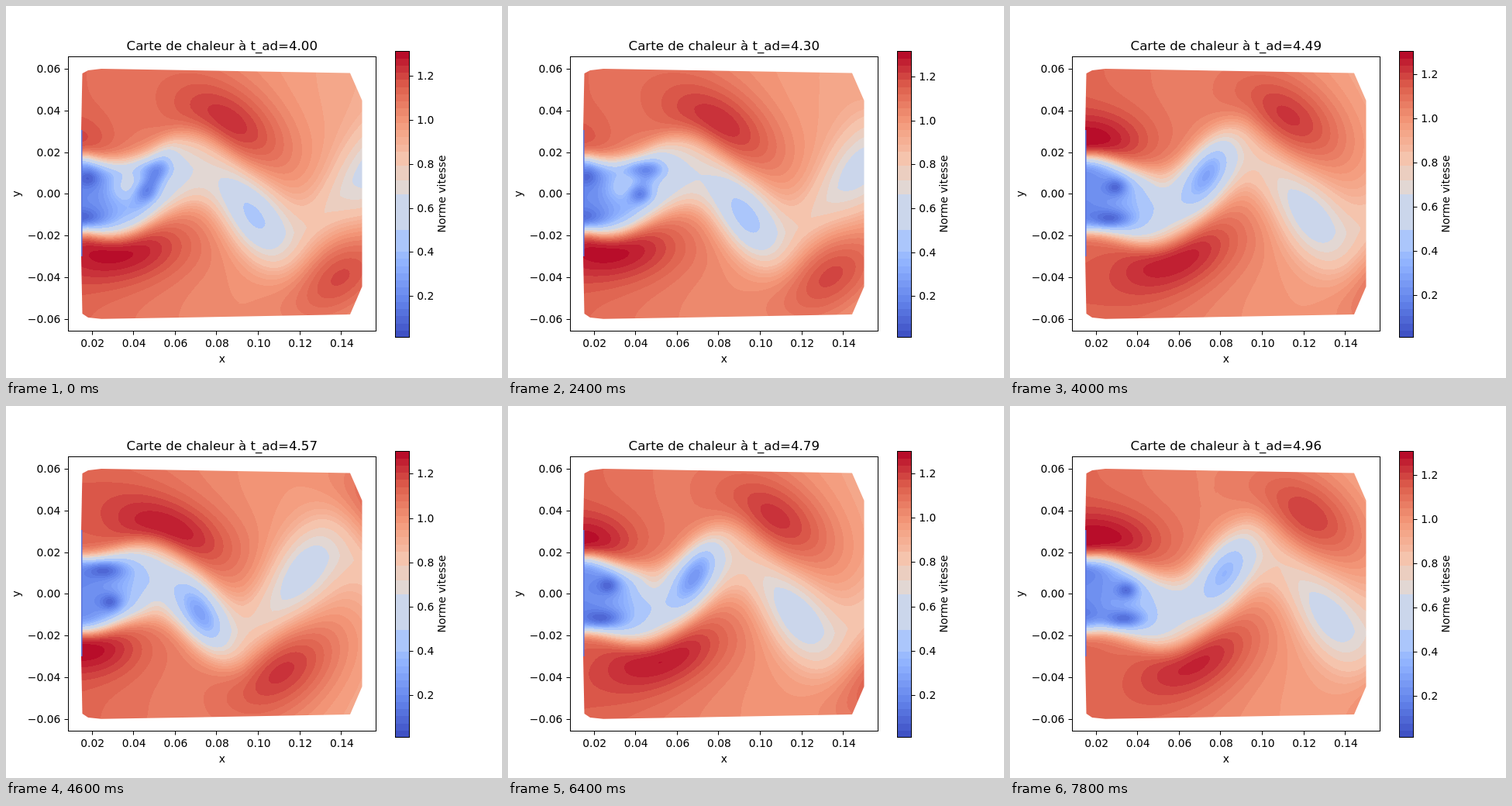
An HTML page with a canvas for the animation above (8000 ms loop, 640x480 px).

```html
<!DOCTYPE html>
<html lang="fr">
<head>
<meta charset="utf-8">
<title>Carte de chaleur</title>
<style>
html, body { margin: 0; width: 100%; height: 100%; overflow: hidden; background: #fff; }
canvas, svg { position: absolute; left: 0; top: 0; }
canvas {
  clip-path: polygon(98.5px 87px, 106px 83px, 123px 81px, 444px 86.5px, 459.5px 122px,
    459.5px 362px, 444px 398px, 123px 403.8px, 106px 402px, 98.5px 397px, 97px 323px, 97px 160px);
}
text { font: 13.89px "DejaVu Sans", sans-serif; fill: #000; }
.line { stroke: #000; stroke-width: 1; fill: none; }
</style>
</head>
<body>
<canvas id="map" width="640" height="480"></canvas>
<svg id="plot" width="640" height="480" viewBox="0 0 640 480"></svg>
<script>
const STEP = 200, STEPS = 40, TURN = 0.1625;
const X0 = 97, Y0 = 80, W = 363, H = 325, MID = 242.5, BANDS = 40, WAVE = 265;

const clamp = (v, lo, hi) => Math.min(hi, Math.max(lo, v));
function smooth(a, b, t) {
  const u = clamp((t - a) / (b - a), 0, 1);
  return u * u * (3 - 2 * u);
}

// Each part of a vortex gives its place, strength and size for its age in shedding periods.
const nearLife = a => .7 * smooth(-1.3, -.95, a) * (1 - smooth(-.62, -.4, a));

function slowCore(a) {
  const x = 320 + WAVE * a + 350 * Math.max(0, a - .25) ** 2;
  return {
    x, off: Math.min(30, 17 + (x - 190) * .14),
    amp: smooth(-.62, -.42, a) * (.2 + .2 * Math.exp(-2.6 * a)),
    long: clamp(26 + (a + .5) * 38, 20, 48), short: clamp(10 + (a + .5) * 32, 9, 28), deg: 60
  };
}

function shearBand(a) {
  const u = clamp((a + 1.05) / .65, 0, 1);
  return { x: 95 + 125 * u ** 1.7, off: 29 + 4 * u, amp: nearLife(a), long: 18, short: 8, deg: 0 };
}

function darkSpot(a) {
  const u = Math.max(0, a + 1.1);
  return { x: 97 + 70 * u + 115 * u * u, off: 45 * u - 25, amp: nearLife(a), long: 10, short: 8, deg: 0 };
}

function lightSpot(a) {
  const amp = -.5 * smooth(-.2, -.03, a) * (1 - smooth(.05, .34, a));
  return { x: 152 + 165 * a, off: -10, amp, long: 16, short: 12, deg: -20 };
}

function fastCore(a) {
  const run = 30 * Math.log(1 + Math.exp((193 + 290 * a) / 30));
  const grow = smooth(-1.1, -.5, a);
  return {
    x: X0 + run, off: -66 - .11 * run, amp: smooth(-1.25, -.65, a) * (.21 + .00015 * run),
    long: 24 + 38 * grow, short: 24 + 6 * grow + 8 * smooth(-.5, .2, a), deg: 35 * smooth(-.7, .05, a)
  };
}

const COOLWARM = ["3b4cc0", "6282ea", "8db0fe", "b8d0f9", "dddcdc", "f5c4ad", "f49a7b", "de604d", "b40426"]
  .map(h => [0, 2, 4].map(k => parseInt(h.slice(k, k + 2), 16)));

function coolwarm(t) {
  const i = Math.min(7, Math.floor(t * 8)), u = t * 8 - i;
  return COOLWARM[i].map((v, k) => Math.round(v + (COOLWARM[i + 1][k] - v) * u));
}

// Pale bands are wider than the others.
const edges = [];
for (let i = 0; i <= BANDS; i++) {
  if (i < 13 || i > 25 || [15, 20, 22, 24].includes(i)) edges.push(i);
}
const bands = edges.slice(1).map((top, i) => ({
  low: edges[i], top, rgb: coolwarm((edges[i] + top) / 2 / BANDS)
}));
const lut = Array.from({ length: BANDS }, (_, i) => bands.find(b => i < b.top).rgb);

const speed = new Float32Array(W * H), drag = new Float32Array(W * H);

function stamp({ x, off, amp, long, short, deg }, side, apply) {
  if (!amp) return;
  const cx = x - X0, cy = MID + side * off - Y0, r = Math.max(long, short) * 3.6;
  const ang = deg * Math.PI / 180, c = Math.cos(ang), s = side * Math.sin(ang);
  const left = Math.max(0, Math.ceil(cx - r)), right = Math.min(W, cx + r);
  const top = Math.max(0, Math.ceil(cy - r)), bottom = Math.min(H, cy + r);
  for (let j = top; j < bottom; j++) {
    for (let i = left; i < right; i++) {
      const dx = i - cx, dy = j - cy;
      const u = (dx * c + dy * s) / long, v = (dy * c - dx * s) / short, q = u * u + v * v;
      if (q < 13) apply(j * W + i, amp * Math.exp(-q / 2));
    }
  }
}

const add = (k, v) => { speed[k] += v; };
const slow = (k, v) => { drag[k] *= 1 - v; };

function buildField(phase) {
  // Meandering wake: it gets shallower, softer and swings wider downstream.
  for (let i = 0; i < W; i++) {
    const depth = .1 + .72 / (1 + (i / 115) ** 2);
    const half = 47 - .05 * i, soft = 5 + .04 * i;
    const sway = clamp(.25 * (i - 8), 0, 50);
    const mid = MID - Y0 + sway * Math.cos(2 * Math.PI * (phase - (X0 + i - 365) / WAVE));
    for (let j = 0; j < H; j++) {
      speed[j * W + i] = 1.12 - .00055 * i;
      drag[j * W + i] = 1 - depth / (1 + Math.exp((Math.abs(j - mid) - half) / soft));
    }
  }
  // A vortex is shed every half period, on alternate sides.
  const n = Math.floor(phase * 2);
  for (let j = -3; j <= 1; j++) {
    const age = phase - n / 2 + j / 2, side = (n + j) % 2 ? -1 : 1;
    stamp(fastCore(age), side, add);
    for (const part of [slowCore, shearBand, darkSpot, lightSpot]) stamp(part(age), side, slow);
  }
}

const ctx = document.getElementById("map").getContext("2d");
const image = ctx.createImageData(W, H);

function paintField(min, max) {
  const scale = BANDS / (max - min), px = image.data;
  for (let k = 0; k < W * H; k++) {
    const c = lut[clamp(Math.floor((speed[k] * drag[k] - min) * scale), 0, BANDS - 1)];
    px[k * 4] = c[0];
    px[k * 4 + 1] = c[1];
    px[k * 4 + 2] = c[2];
    px[k * 4 + 3] = 255;
  }
  ctx.putImageData(image, X0, Y0);
  ctx.fillStyle = "#5d76dc";
  ctx.fillRect(97, 160, 1.5, 163);
}

const svg = document.getElementById("plot");
function el(tag, attrs, text) {
  const node = document.createElementNS("http://www.w3.org/2000/svg", tag);
  for (const key in attrs) node.setAttribute(key, attrs[key]);
  if (text) node.textContent = text;
  return svg.appendChild(node);
}
const label = (x, y, text, anchor = "middle", more = {}) =>
  el("text", { x, y, "text-anchor": anchor, ...more }, text);
const tick = d => el("path", { d, class: "line" });
const upright = (x, y, text) => label(0, 0, text, "middle", { transform: `translate(${x} ${y}) rotate(-90)` });

el("rect", { x: 80.5, y: 65.5, width: 397, height: 354, class: "line" });
for (let i = 0; i < 7; i++) {
  const x = 111.6 + i * 53.63, y = 81.2 + i * 53.75, v = .06 - i * .02;
  tick(`M${Math.round(x) - .5} 420v4.5`);
  label(x, 440, (.02 + i * .02).toFixed(2));
  tick(`M80 ${Math.round(y) + .5}h-4.5`);
  label(70.3, Math.round(y + 5), (v < -.001 ? "\u2212" : "") + Math.abs(v).toFixed(2), "end");
}
label(278.8, 460, "x");
upright(18, 242.5, "y");
upright(567, 242.5, "Norme vitesse");

const BAR = 369.6 / BANDS;
for (const b of bands) {
  el("rect", {
    x: 502.5, y: 428 - b.top * BAR, width: 18, height: (b.top - b.low) * BAR,
    fill: `rgb(${b.rgb})`, "shape-rendering": "crispEdges"
  });
}
el("rect", { x: 502.5, y: 58.5, width: 18, height: 369, class: "line" });
const marks = [.2, .4, .6, .8, 1, 1.2].map(v => ({
  line: tick("M521 0h4.5"), text: label(530.2, 0, v.toFixed(1), "start")
}));
const title = label(278.8, 57, "", "middle", { style: "font-size:16.67px" });

function draw(step) {
  const phase = step * TURN;
  const swing = Math.cos(4 * Math.PI * (phase - .45));
  const low = 373.6 + .7 * swing, high = 89 + 1.8 * swing;
  marks.forEach((m, i) => {
    const y = Math.round(low + (high - low) * i / 5);
    m.line.setAttribute("transform", `translate(0 ${y + .5})`);
    m.text.setAttribute("y", y + 5);
  });
  title.textContent = "Carte de chaleur à t_ad=" + (4 + step * .0246).toFixed(2);
  const unit = low - high;
  buildField(phase);
  paintField(.2 - (428 - low) / unit, 1.2 + (high - 58.5) / unit);
}

let shown = -1;
const start = performance.now();
function loop() {
  const step = Math.floor((performance.now() - start) / STEP) % STEPS;
  if (step !== shown) draw(shown = step);
  requestAnimationFrame(loop);
}
loop();
</script>
</body>
</html>
```
